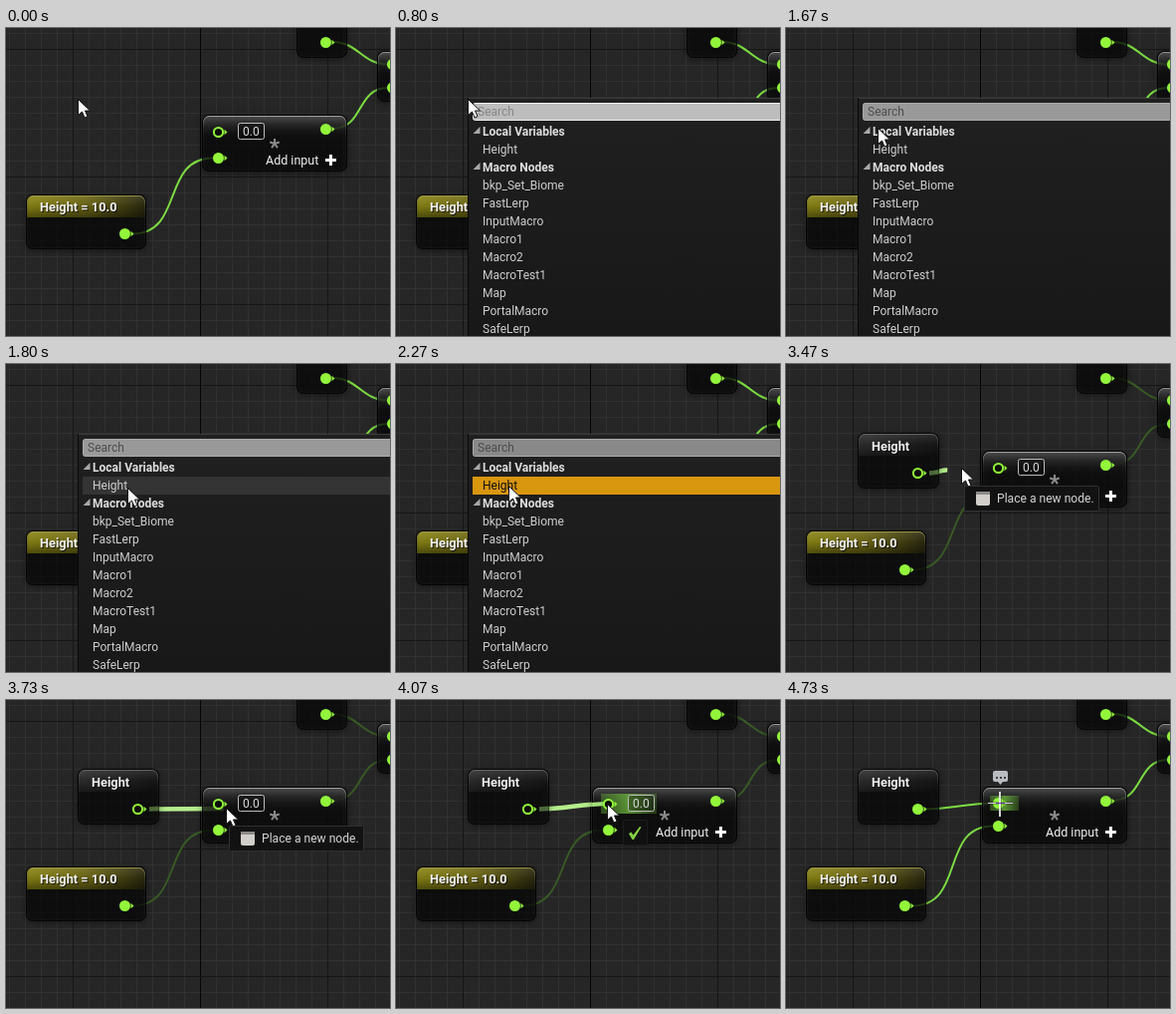
An HTML page with a canvas for the animation above (5.39 s loop, 386 by 309 pixels).

```html
<!DOCTYPE html>
<html lang="en">
<head>
<meta charset="utf-8">
<title>Node graph</title>
<style>
html, body { margin: 0; width: 100%; height: 100%; overflow: hidden; background: #262626; }
canvas { display: block; width: 386px; height: 309px; }
</style>
</head>
<body>
<canvas id="stage"></canvas>
<script>
const W = 386, H = 309, LOOP = 5390, FPS = 15;
const FONT = 'Roboto, Arial, sans-serif';
const GREEN = '#92f53b';
const canvas = document.getElementById('stage');
const ctx = canvas.getContext('2d');
const dpr = window.devicePixelRatio || 1;
canvas.width = W * dpr;
canvas.height = H * dpr;

// Pointer path in ticks of 1/15 s: [tick, x, y]
const PATH = [
  [0, 72, 71], [24, 72, 71], [25, 92, 100], [26, 119, 150], [27, 122, 124],
  [30, 113, 122], [40, 113, 122], [42, 122, 113], [44, 130, 108], [51, 130, 108],
  [52, 176, 104], [54, 205, 107], [56, 221, 108], [60, 212, 104], [61, 212, 104],
  [62, 215, 103], [81, 215, 103]
];
const MENU = ['Local Variables', 'Height', 'Macro Nodes', 'bkp_Set_Biome', 'FastLerp', 'InputMacro',
  'Macro1', 'Macro2', 'MacroTest1', 'Map', 'PortalMacro', 'SafeLerp'];

const mix = (a, b, k) => a + (b - a) * k;
const clamp = v => Math.max(0, Math.min(1, v));

function pointer(tick) {
  const i = Math.max(1, PATH.findIndex(p => p[0] >= tick));
  const a = PATH[i - 1], b = PATH[i];
  const k = (tick - a[0]) / (b[0] - a[0]);
  return { x: Math.round(mix(a[1], b[1], k)), y: Math.round(mix(a[2], b[2], k)) };
}

function gradient(x0, y0, x1, y1, ...colors) {
  const g = ctx.createLinearGradient(x0, y0, x1, y1);
  colors.forEach((c, i) => g.addColorStop(i / (colors.length - 1), c));
  return g;
}

function rect(x, y, w, h, fill) {
  ctx.fillStyle = fill;
  ctx.fillRect(x, y, w, h);
}

function rounded(x, y, w, h, r, fill, stroke) {
  ctx.beginPath();
  ctx.roundRect(x, y, w, h, r);
  if (fill) { ctx.fillStyle = fill; ctx.fill(); }
  if (stroke) { ctx.strokeStyle = stroke; ctx.lineWidth = 1; ctx.stroke(); }
}

function poly(points, fill) {
  ctx.beginPath();
  points.forEach(p => ctx.lineTo(p[0], p[1]));
  ctx.closePath();
  ctx.fillStyle = fill;
  ctx.fill();
}

function line(x0, y0, x1, y1, color, width) {
  ctx.strokeStyle = color;
  ctx.lineWidth = width;
  ctx.beginPath();
  ctx.moveTo(x0, y0);
  ctx.lineTo(x1, y1);
  ctx.stroke();
}

function text(s, x, y, color, size = 12, weight = 400) {
  ctx.font = `${weight} ${size}px ${FONT}`;
  ctx.fillStyle = color;
  ctx.fillText(s, x, y);
}

function title(s, x, y) {
  text(s, x + 1, y + 1, 'rgba(0,0,0,.7)', 12.8, 700);
  text(s, x, y, '#f0f0f0', 12.8, 700);
}

function grid() {
  rect(0, 0, W, H, '#262626');
  for (const major of [false, true]) {
    for (let i = -13; i < 13; i++) {
      if ((i % 8 === 0) !== major) continue;
      rect(195 + i * 16, 0, 1, H, major ? (i ? '#161616' : '#050505') : '#313131');
      rect(0, 149 + i * 16, W, 1, major ? '#161616' : '#313131');
    }
  }
}

function wire(x0, y0, x1, y1, color, width) {
  const bend = (Math.abs(x1 - x0) + Math.abs(y1 - y0)) / 3;
  ctx.strokeStyle = color;
  ctx.lineWidth = width;
  ctx.beginPath();
  ctx.moveTo(x0, y0);
  ctx.bezierCurveTo(x0 + bend, y0, x1 - bend, y1, x1, y1);
  ctx.stroke();
}

function pin(x, y, linked) {
  ctx.beginPath();
  ctx.arc(x, y, linked ? 5.5 : 4.6, 0, 7);
  if (linked) {
    ctx.fillStyle = GREEN;
    ctx.fill();
  } else {
    ctx.fillStyle = '#0b0d09';
    ctx.fill();
    ctx.strokeStyle = GREEN;
    ctx.lineWidth = 2;
    ctx.stroke();
  }
  poly([[x + 6, y - 2.7], [x + 9, y], [x + 6, y + 2.7]], GREEN);
}

function node(x, y, w, h, head, gloss) {
  ctx.save();
  ctx.shadowColor = 'rgba(0,0,0,.7)';
  ctx.shadowBlur = 7 * dpr;
  ctx.shadowOffsetY = dpr;
  rounded(x, y, w, h, 7, 'rgba(8,9,8,.62)');
  ctx.restore();
  ctx.save();
  ctx.beginPath();
  ctx.roundRect(x + 1, y + 1, w - 2, h - 2, 6);
  ctx.clip();
  if (head) {
    rect(x, y, w, 23, head);
    rect(x, y, w, 23, gradient(0, y, 0, y + 23, 'rgba(255,255,255,.1)', 'rgba(0,0,0,.1)', 'rgba(0,0,0,.45)'));
  } else {
    rect(x, y, w, 26, gradient(0, y, 0, y + 26, 'rgba(130,130,130,.6)', 'rgba(60,60,60,.35)', 'rgba(20,20,20,0)'));
  }
  ctx.restore();
  rounded(x + .5, y + .5, w - 1, h - 1, 7, null, 'rgba(0,0,0,.75)');
  rounded(x + 1.5, y + 1.5, w - 3, h - 3, 6, null,
    gradient(0, y, 0, y + 26, gloss, 'rgba(70,70,70,.35)', 'rgba(30,30,30,.3)'));
}

function glow(x, y, w, h) {
  rect(x, y, w, h, gradient(x, 0, x + w, 0, 'rgba(112,190,62,.35)', 'rgba(112,190,62,.75)', 'rgba(112,190,62,.25)'));
}

function bubble(x, y, alpha) {
  ctx.globalAlpha = alpha;
  rounded(x, y, 15, 11, 2, '#b9bcc0');
  poly([[x + 5, y + 11], [x + 10, y + 11], [x + 7.5, y + 14]], '#b9bcc0');
  for (let i = 0; i < 3; i++) rect(x + 3 + i * 4, y + 6, 2, 2, '#3c3e42');
  ctx.globalAlpha = 1;
}

function arrow({ x, y }) {
  const shape = [[0, 0], [0, 16], [4, 12.5], [6.5, 18.5], [9.5, 17.2], [7, 11.5], [12, 11.5]]
    .map(p => [x + .5 + p[0], y + .5 + p[1]]);
  poly(shape, '#fff');
  ctx.lineJoin = 'round';
  ctx.strokeStyle = '#111';
  ctx.lineWidth = 1;
  ctx.stroke();
}

function cross({ x, y }) {
  rect(x - 1, y - 11, 3, 25, 'rgba(20,20,20,.3)');
  rect(x - 12, y - 1, 25, 3, 'rgba(20,20,20,.3)');
  rect(x - 12, y, 25, 1, '#d8c8f0');
  rect(x - 1, y - 11, 2, 25, 'rgba(245,245,245,.85)');
  rect(x - 4, y, 9, 1, '#7a35c8');
}

function menu(tick, at) {
  const left = 72, top = 70;
  rect(left, top, W - left, H - top, gradient(0, top, 0, H, '#202020', '#181818'));
  rect(left, top, W - left, 1, '#3a3a3a');
  rect(left, top, 1, H - top, '#090909');
  const over = tick < 25, picked = tick >= 34;
  rounded(77.5, 75.5, 320, 17, 2, over ? '#bdbdbd' : picked ? '#898989' : '#999', over ? '#f0f0f0' : '#aaa');
  text('Search', 82, 88, over ? '#858585' : '#4c4c4c');
  MENU.forEach((name, i) => {
    const y = 95 + i * 18, heading = i === 0 || i === 2;
    const hovered = !heading && at.y >= y && at.y < y + 18;
    if (hovered) rect(77, y, W - 77, 18, picked ? '#d9960f' : '#343434');
    if (heading) poly([[84.5, y + 4], [84.5, y + 11], [77.5, y + 11]], '#a8a8a8');
    text(name, 87, y + 13, hovered && picked ? '#101010' : heading ? '#dedede' : '#cfcfcf', 12, heading ? 700 : 400);
  });
}

function hint(alpha) {
  ctx.globalAlpha = alpha;
  // Bright pins and labels shine through while it fades in
  if (alpha < 1) ctx.globalCompositeOperation = 'lighten';
  rect(160, 121, 155, 32, '#999');
  ctx.globalCompositeOperation = 'source-over';
  text('Voxel Portal Node Output', 169, 141, '#080808');
  ctx.globalAlpha = 1;
}

function dragTip({ x, y }, onPin) {
  if (onPin) {
    rounded(x + 16.5, y + 16.5, 24, 25, 1, '#101010', '#1c1c1c');
    const check = [[22, 30], [24.5, 28.5], [26.5, 31.5], [33, 23], [34.5, 23.5], [27, 36], [25.5, 36]];
    poly(check.map(p => [x + p[0], y + p[1]]), '#84cf45');
    return;
  }
  rounded(x + 3.5, y + 18.5, 135, 25, 1, '#121212', '#303030');
  rounded(x + 15, y + 24, 14, 14, 2, '#d2cfca');
  rect(x + 15, y + 24, 14, 3, '#8d8b88');
  text('Place a new node.', x + 36, y + 35, '#d4d4d4', 12.1);
}

function draw(ms) {
  const tick = Math.floor((ms + 5) * FPS / 1000);
  const at = pointer(tick);
  const menuOpen = tick >= 12 && tick < 37;
  const placed = tick >= 37;
  const dragging = tick >= 52 && tick < 62;
  const onPin = tick >= 57 && tick < 62;
  const linked = tick >= 62;
  const outHover = tick >= 43 && tick < 52;
  const dim = tick < 62 ? clamp((tick - 48) / 2) : clamp((65 - tick) / 4);
  const lowPin = linked ? 126 : 130;
  const wireColor = `rgb(${[[124, 56], [222, 90], [66, 38]].map(([a, b]) => Math.round(mix(a, b, dim)))})`;
  const link = (...ends) => wire(...ends, wireColor, 2);

  ctx.setTransform(dpr, 0, 0, dpr, 0, 0);
  grid();

  link(328, 14, 384, 36.5);
  link(328, 101, 384, 60);
  link(127, 206.5, 208, lowPin + .5);
  if (linked) link(140, 109.5, 208, 103.5);
  if (dragging) {
    const prev = pointer(tick - 1);
    const ex = onPin ? 212 : mix(at.x, prev.x, .3);
    const ey = onPin ? 104 : mix(at.y, prev.y, .3) + 1;
    wire(144, 109.5, ex, ey, '#b4ee8c', 4.5);
  }

  node(292, -30, 51, 60, null, '#555');
  pin(321.5, 14.5, true);
  node(373, 23, 60, 51, null, '#a8a8a8');
  pin(388.5, 36.5, true);
  pin(388.5, 60, true);

  node(20, 167, 121, 55, gradient(20, 0, 141, 0, '#8f8a16', '#716b16', '#2c2a10'), '#aaa44c');
  title('Height = 10.0', 34, 184);
  pin(119.5, 206.5, true);

  node(197, 87, 146, 57, null, '#b4b4b4');
  if (onPin) {
    line(197, 105, 210, 104, '#a5e07c', 4);
    glow(206, 94, 56, 20);
  }
  if (linked) glow(205, 96, 29, 15);
  pin(213.5, linked ? 103.5 : 104.5, linked);
  pin(213.5, lowPin + .5, true);
  pin(321.5, 101.5, true);
  if (!linked) {
    rounded(233.5, 95.5, 26, 16, 2, 'rgba(10,10,10,.35)', '#bdbdbd');
    text('0.0', 238, 108, '#d8d8d8');
  }
  for (let i = 0; i < 5; i++) {
    const a = i * Math.PI * .4 - Math.PI / 2;
    line(270, 116, 270 + 5 * Math.cos(a), 116 + 5 * Math.sin(a), '#8b8b8b', 2);
  }
  text('Add input', 261, 137, '#f0f0f0', 12.5);
  rect(321, 131, 11, 3, '#fff');
  rect(325, 127, 3, 11, '#fff');

  if (placed) {
    node(72, 69, 82, 56, gradient(72, 0, 154, 0, '#303030', '#181818'), '#6c6c6c');
    title('Height', 86, 87);
    if (dragging) line(144, 109.5, 154, 108.5, 'rgba(150,215,110,.3)', 4.5);
    if (outHover) glow(117, 99, 27, 18);
    pin(132.5, 109.5, linked);
  }

  if (tick >= 44 && tick < 49) hint(Math.min(1, .35 * (tick - 43)));
  if (tick >= 47 && tick < 49) bubble(84, 54, tick > 47 ? 1 : .5);
  if (tick >= 70) bubble(208, 71, tick > 70 ? 1 : .5);
  if (menuOpen) menu(tick, at);
  if (dragging) dragTip(at, onPin);
  (outHover || linked ? cross : arrow)(at);
}

const start = performance.now();
function frame() {
  draw((performance.now() - start) % LOOP);
  requestAnimationFrame(frame);
}
frame();
</script>
</body>
</html>
```
